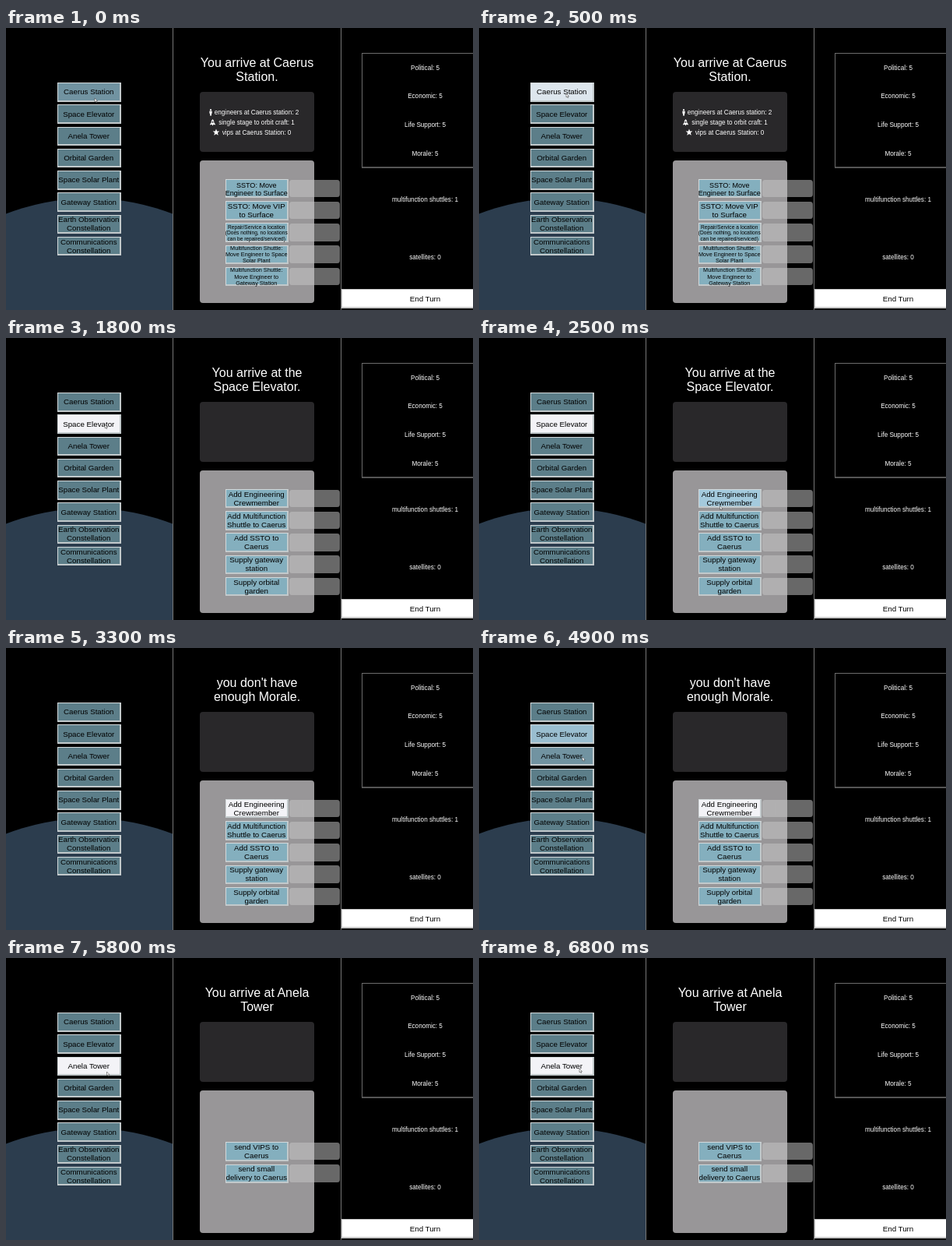
These frames come from a looping animation (600 by 362 pixels, 7.1 s). An HTML page:

```html
<!DOCTYPE html>
<html lang="en">
<head>
<meta charset="utf-8">
<title>Station game</title>
<style>
  html, body { margin: 0; width: 100%; height: 100%; overflow: hidden; background: #000; }
  #stage { position: absolute; left: 0; top: 0; width: 600px; height: 362px; overflow: hidden;
    font: 9.75px/1.12 "Liberation Sans", Arial, sans-serif; color: #fff; background: #000; }
  #stage div, #stage svg { position: absolute; box-sizing: border-box; }
  .btn { display: flex; align-items: center; justify-content: center; width: 81.5px; height: 24.5px;
    padding-top: 2px; border: solid; border-width: 1px 2px 2px 1px;
    border-color: #d3d9db #c2c9cb #c2c9cb #d3d9db; color: #000; text-align: center; white-space: pre; }
  .pad { left: 364px; width: 65px; height: 22.5px; border-radius: 3.5px; background: rgba(200, 200, 200, .52); }
  .line { width: 200px; height: 12px; font-size: 8.15px; line-height: 12px; text-align: center; white-space: pre; }
  .panel { left: 249px; width: 147px; border-radius: 4px; }
  .rule { top: 0; width: 1px; height: 362px; background: #777; }
  #title { left: 222px; top: 36px; width: 201px; font-size: 16px; line-height: 18px;
    text-align: center; white-space: pre; }
  #stats { left: 457px; top: 32px; width: 160px; height: 148px; border: 1px solid #6c6c6c; border-bottom: 2px solid #555; }
  #turn { left: 431px; top: 335px; width: 215px; height: 25px; border: solid #c8c8c8; border-width: 1px 1px 2px;
    background: #fff; color: #000; line-height: 23px; text-align: center; }
</style>
</head>
<body>
<div id="stage">
  <svg width="214" height="362" style="left:0;top:0"><circle cx="107" cy="514" r="295.5" fill="#2c3d4e"/></svg>
  <div class="rule" style="left:214px"></div>
  <div class="rule" style="left:430px"></div>
  <div class="panel" style="top:82px;height:77px;background:#29282a"></div>
  <div class="panel" style="top:170px;height:183px;background:#989698"></div>
  <div id="title"></div>
  <div id="stats"></div>
  <div id="turn">End Turn</div>
</div>
<script>
const LOOP = 7100, STEP = 100, PITCH = 28.25, FADE = 4, GLIDE = 300;
const HOVER = [175, 211, 231], FOCUS = [243, 243, 247];
const SIDE = [92, 126, 137], ACTION = [132, 175, 190];
const stage = document.getElementById('stage');
const title = document.getElementById('title');
const pen = document.createElement('canvas').getContext('2d');
pen.font = '100px "Liberation Sans", Arial, sans-serif';

const mix = (a, b, f) => a.map((v, i) => v + (b[i] - v) * f);
const easeOut = f => 1 - (1 - f) ** 3;

function add(parent, cls, text, x, y) {
  const el = document.createElement('div');
  el.className = cls;
  el.textContent = text;
  el.style.left = x && x + 'px';
  el.style.top = y + 'px';
  parent.append(el);
  return el;
}

function addSvg(parent, x, y, body) {
  parent.insertAdjacentHTML('beforeend',
    `<svg style="left:${x}px;top:${y}px;overflow:visible" width="8" height="9" fill="#fff">${body}</svg>`);
  return parent.lastElementChild;
}

// Largest type that fits the button in both directions
function fit(text) {
  const lines = text.split('\n');
  const widest = Math.max(...lines.map(s => pen.measureText(s).width / 100));
  return Math.min(9.75, 80 / widest, 21.8 / lines.length);
}

const buttons = [];
function addButton(parent, text, x, y, base) {
  const el = add(parent, 'btn', text, x, y);
  el.style.fontSize = fit(text) + 'px';
  const button = { el, parent, x, y, base, now: base, from: base, goal: base, age: 0 };
  buttons.push(button);
  return button;
}

const places = ['Caerus Station', 'Space Elevator', 'Anela Tower', 'Orbital Garden',
  'Space Solar Plant', 'Gateway Station', 'Earth Observation\nConstellation',
  'Communications\nConstellation'
].map((name, i) => addButton(stage, name, 66, 70 + i * PITCH, SIDE));

['Political: 5', 'Economic: 5', 'Life Support: 5', 'Morale: 5']
  .forEach((text, i) => add(stage, 'line', text, 438.5, 45.5 + 36.8 * i));
['multifunction shuttles: 1', 'satellites: 0']
  .forEach((text, i) => add(stage, 'line', text, 438.5, 215 + 74 * i));

function makePage(labels) {
  const page = add(stage, '', '', 0, 0);
  const top = 264.5 - labels.length * PITCH / 2;
  page.buttons = labels.map((text, i) => {
    const y = top + i * PITCH;
    add(page, 'pad', '', '', y + .7);
    return addButton(page, text, 281.5, y, ACTION);
  });
  return page;
}

const caerus = makePage([
  'SSTO: Move\nEngineer to Surface',
  'SSTO: Move VIP\nto Surface',
  'Repair/Service a location\n(Does nothing, no locations\ncan be repaired/serviced)',
  'Multifunction Shuttle:\nMove Engineer to Space\nSolar Plant',
  'Multifunction Shuttle:\nMove Engineer to\nGateway Station'
]);
const elevator = makePage([
  'Add Engineering\nCrewmember',
  'Add Multifunction\nShuttle to Caerus',
  'Add SSTO to\nCaerus',
  'Supply gateway\nstation',
  'Supply orbital\ngarden'
]);
const tower = makePage(['send VIPS to\nCaerus', 'send small\ndelivery to Caerus']);
const pages = [caerus, elevator, tower];

['engineers at Caerus station: 2', 'single stage to orbit craft: 1', 'vips at Caerus Station: 0']
  .forEach((text, i) => add(caerus, 'line', text, 222, 102.5 + 13 * i));
addSvg(caerus, 260.5, 104, '<circle cx="2" cy="1.1" r="1.1"/><path d="M.4 2.6H3.6V5.8H3V8.6H1V5.8H.4Z"/>');
addSvg(caerus, 262, 117,
  '<path d="M3.5 0Q5.8 2 5.4 4.5L6.8 6.2V7.6L4.6 6.8 3.5 8.6 2.4 6.8.2 7.6V6.2L1.6 4.5Q1.2 2 3.5 0Z"/>' +
  '<circle cx="3.5" cy="3.8" r="1" fill="#29282a"/>');
const star = Array.from({ length: 10 }, (_, i) => {
  const r = i % 2 ? 2 : 4.6, a = i * Math.PI / 5;
  return [r * Math.sin(a), -r * Math.cos(a)];
}).join(' ');
addSvg(caerus, 269.5, 134.3, `<polygon points="${star}"/>`);

const cursor = addSvg(stage, 0, 0,
  '<path d="M0 0V4.8L1.1 3.9 1.9 5.6 2.8 5.2 2.1 3.6H3.5Z" stroke="#333" stroke-width=".5"/>');

// What each click focuses and shows
const scenes = [
  { at: 0, page: caerus, text: 'You arrive at Caerus\nStation.' },
  { at: 300, page: caerus, text: 'You arrive at Caerus\nStation.', focus: places[0] },
  { at: 1500, page: elevator, text: 'You arrive at the\nSpace Elevator.', focus: places[1] },
  { at: 3000, page: elevator, text: "you don't have\nenough Morale.", focus: elevator.buttons[0] },
  { at: 5500, page: tower, text: 'You arrive at Anela\nTower', focus: places[2] }
];

// Cursor moves: start time and destination
const moves = [
  [0, 112, 84], [1000, 128, 119.5], [1300, 127, 111],
  [2100, 309.5, 215.5], [2500, 318, 209.5], [4200, 137, 116],
  [4800, 131, 150], [4900, 130, 160], [5200, 129.5, 146], [6500, 129, 142]
];

function cursorAt(t) {
  return moves.reduce((p, [start, ...to]) =>
    t > start ? mix(p, to, easeOut(Math.min(1, (t - start) / GLIDE))) : p, [114, 90]);
}

// Fades restart from the current colour whenever the goal changes
function fade(button, goal) {
  if (goal !== button.goal) Object.assign(button, { from: button.now, goal, age: 0 });
  button.age++;
  button.now = mix(button.from, goal, Math.min(1, button.age / FADE));
  return `rgb(${button.now.map(Math.round)})`;
}

const states = Array.from({ length: LOOP / STEP }, (_, i) => {
  const t = i * STEP, [x, y] = cursorAt(t);
  const scene = scenes.filter(s => s.at <= t).pop();
  const colors = buttons.map(b => {
    const live = b.parent === stage || b.parent === scene.page;
    const over = live && x >= b.x && x < b.x + 81.5 && y >= b.y && y < b.y + 24.5;
    return fade(b, b === scene.focus ? FOCUS : over ? HOVER : b.base);
  });
  return { x, y, scene, colors };
});

function draw({ x, y, scene, colors }) {
  pages.forEach(p => { p.style.display = p === scene.page ? '' : 'none'; });
  title.textContent = scene.text;
  buttons.forEach((b, i) => { b.el.style.background = colors[i]; });
  cursor.style.transform = `translate(${x}px, ${y}px)`;
}

const start = performance.now();
function tick() {
  const t = (performance.now() - start) % LOOP;
  draw(states[Math.floor(t / STEP)]);
  requestAnimationFrame(tick);
}
tick();
</script>
</body>
</html>
```
